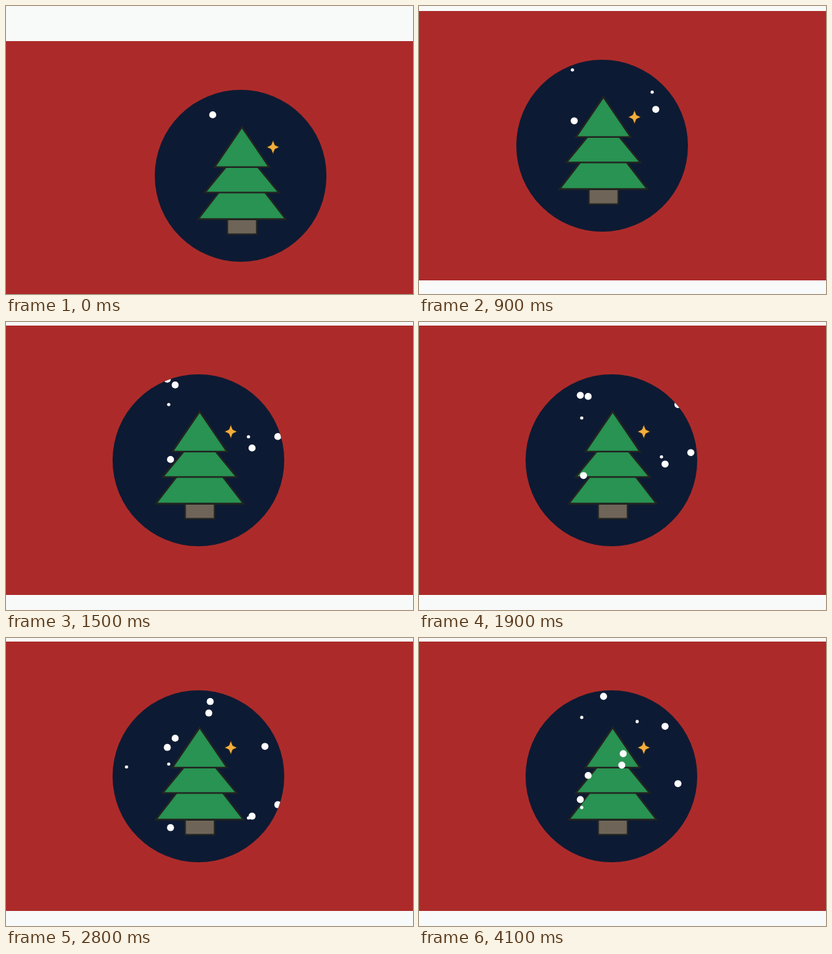
Animation of 569 by 402 pixels, one loop 4.2 s. Source, as an HTML page with a canvas:

```html
<!DOCTYPE html>
<html lang="en">
<head>
<meta charset="utf-8">
<title>Snowy tree</title>
<style>
  html, body { margin: 0; width: 100%; height: 100%; overflow: hidden; background: #f8faf9; }
  canvas { display: block; }
</style>
</head>
<body>
<canvas id="stage" width="569" height="402"></canvas>
<script>
const ctx = document.getElementById('stage').getContext('2d');
const LOOP = 4200, STEP = 100;
const CENTER = { x: 269, y: 193, radius: 120 };

// Snowflakes in order of release: x and seconds to fall
const FLAKES = [
  [230, 5], [344, 5], [380, 5], [339, 4], [227.5, 6], [362, 7], [236.5, 7], [225.5, 5], [168.5, 3],
  [146, 5], [283.5, 5], [285.5, 5], [344, 7], [305, 6], [227.5, 5], [380, 5], [258, 5]
];
const FALL_HEIGHT = 280, RELEASE_GAP = 2 / 7, FIRST_RELEASE = -5 / 7;

function disc(x, y, r, color) {
  ctx.beginPath();
  ctx.arc(x, y, r, 0, Math.PI * 2);
  ctx.fillStyle = color;
  ctx.fill();
}

function shape(points, fill, lineWidth) {
  ctx.beginPath();
  points.forEach(([x, y]) => ctx.lineTo(x, y));
  ctx.closePath();
  ctx.fillStyle = fill;
  ctx.fill();
  ctx.strokeStyle = '#222421';
  ctx.lineWidth = lineWidth;
  ctx.stroke();
}

function tier(top, base, halfWidth) {
  const mid = 270.8;
  shape([[mid, top], [mid + halfWidth, base], [mid - halfWidth, base]], '#289352', 2.3);
}

function star(x, y) {
  const points = Array.from({ length: 8 }, (_, i) => {
    const a = i * Math.PI / 4, r = i % 2 ? 3.9 : 9.2;
    return [x + r * Math.cos(a), y + r * Math.sin(a) * 1.08];
  });
  shape(points, '#f4ad3c', 1);
}

function snow(seconds) {
  FLAKES.forEach(([x, duration], i) => {
    const r = i % 5 < 3 ? 4.9 : 2.3;
    const age = seconds - FIRST_RELEASE - i * RELEASE_GAP;
    const top = CENTER.y - CENTER.radius - 10;
    disc(x, top + r + FALL_HEIGHT * age / duration, r, '#fdfdfd');
  });
}

// Eased move from a to b between two times
function move(ms, start, end, a, b) {
  const p = Math.max(0, Math.min(1, (ms - start) / (end - start)));
  return a + (b - a) * p ** 1.6;
}

function draw(ms) {
  // The scene swings left past its resting place, then settles
  const dx = Math.round(ms < 900 ? move(ms, 700, 900, 59, -13) : move(ms, 900, 1300, -13, 0));
  const dy = Math.round(Math.max(0, Math.min(44, 44 - 0.21 * (ms - 700))));

  ctx.fillStyle = '#f8faf9';
  ctx.fillRect(0, 0, 569, 402);
  ctx.fillStyle = '#ac2b2a';
  ctx.fillRect(0, 5 + dy, 569, 376);

  ctx.save();
  ctx.translate(dx, dy);
  disc(CENTER.x, CENTER.y, CENTER.radius, '#0d1a33');
  ctx.clip();

  shape([[250.5, 254], [291.5, 254], [291.5, 274.5], [250.5, 274.5]], '#6e6558', 2);
  tier(174.5, 253.5, 61.3);
  tier(153.7, 216.4, 51.8);
  tier(125, 180.9, 38.1);
  star(314.3, 153);
  snow(ms / 1000);
  ctx.restore();
}

const start = performance.now();
function tick() {
  const elapsed = (performance.now() - start) % LOOP;
  draw(Math.floor(elapsed / STEP) * STEP);
  requestAnimationFrame(tick);
}
tick();
</script>
</body>
</html>
```
